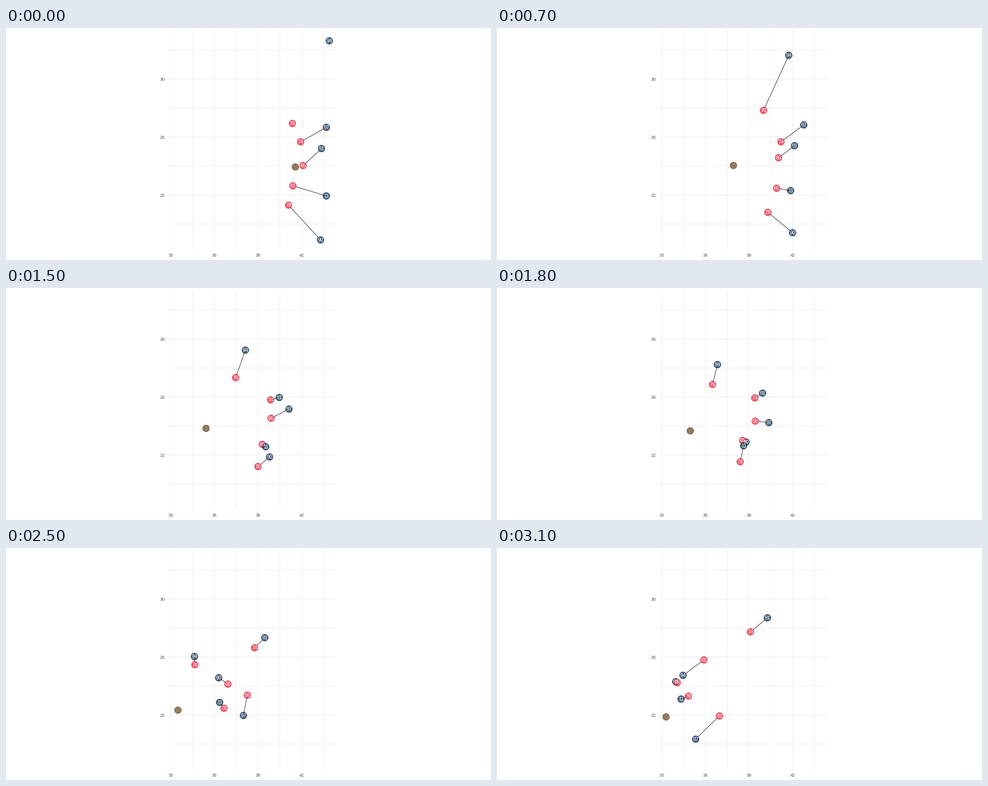
Write a matplotlib script that moves like this. It is 1000 px wide and 480 px high and loops after 3700 ms.

```python
from itertools import permutations

import matplotlib.pyplot as plt
import numpy as np
from matplotlib.animation import FuncAnimation
from matplotlib.collections import LineCollection

W, H, DPI = 1000, 480, 100
PX = 72 / DPI            # points per pixel
UNIT = 30                # pixels per yard
REACH = 5 * UNIT         # longest link between two players
LAST = 31                # motion stops here, then the pose is held
FRAMES = 37
ALPHA = 0.7
NAVY, RED, BROWN = "#002244", "#e31837", "#654321"

# Each player runs a cubic curve through four points at these times.
KEYS = [0, 11, 21, 31]
RUSHERS = {
    90: [(648, 438), (578, 390), (482, 291), (368, 276)],
    91: [(650, 249), (587, 236), (537, 205), (557, 144)],
    94: [(666, 26), (548, 89), (420, 188), (383, 263)],
    97: [(660, 205), (610, 220), (532, 307), (409, 395)],
    11: [(660, 347), (571, 332), (479, 323), (379, 312)],
}
BLOCKERS = {
    65: [(591, 326), (555, 329), (484, 303), (426, 231)],
    66: [(612, 284), (563, 266), (518, 285), (458, 347)],
    74: [(607, 235), (565, 234), (520, 220), (522, 173)],
    76: [(590, 197), (513, 173), (417, 216), (371, 278)],
    78: [(582, 366), (540, 378), (480, 348), (394, 306)],
}
DRAW_ORDER = [90, 91, 94, 97, 65, 66, 74, 78, 11, 76]

now = np.arange(LAST + 1)


def to_pixels(curve):
    """Centre positions on whole pixels."""
    return np.round(curve) + 0.5


def run(points):
    return to_pixels(np.vander(now, 4) @ np.polyfit(KEYS, points, 3))


def ball_run():
    """The ball moves in straight stretches at steady speed."""
    t = [0, 7, 12, 22, 25, 31]
    x = [596, 487, 426, 380, 354, 348]
    y = [287, 284, 286, 301, 335, 349]
    return to_pixels(np.column_stack([np.interp(now, t, x),
                                      np.interp(now, t, y)]))


paths = {n: run(p) for n, p in {**RUSHERS, **BLOCKERS}.items()}
ball = ball_run()


def links(f):
    """Pair blockers with rushers at the least total distance."""
    front = [paths[n][f] for n in BLOCKERS]
    rush = [paths[n][f] for n in RUSHERS]
    dist = [[np.hypot(*(a - b)) for b in rush] for a in front]
    best = min(permutations(range(len(rush))),
               key=lambda order: sum(row[j] for row, j in zip(dist, order)))
    return [(front[i], rush[j]) for i, j in enumerate(best)
            if dist[i][j] <= REACH]


fig = plt.figure(figsize=(W / DPI, H / DPI), dpi=DPI, facecolor="white")
ax = fig.add_axes([0, 0, 1, 1])
ax.set(xlim=(0, W), ylim=(H, 0))
ax.axis("off")


def add_lines(segments, color, width, zorder):
    lines = LineCollection(segments, colors=color, linewidths=width * PX,
                           capstyle="butt", snap=False, zorder=zorder)
    ax.add_collection(lines)
    return lines


def label(x, y, text, size, color, ha="center"):
    return ax.text(x, y, text, fontsize=size * PX, color=color, ha=ha,
                   va="baseline", family="Liberation Sans", zorder=4)


columns = [[(x + 0.5, 5), (x + 0.5, 459)] for x in range(339, 655, 45)]
rows = [[(332, y + 0.5), (682, y + 0.5)] for y in range(45, 406, 60)]
add_lines(columns + rows, "#ebebeb", 1, 1)

for k in range(4):
    label(339.5 + 90 * k, 473, str(33 + 3 * k), 9, "#4d4d4d")
for k in range(3):
    label(327.5, 109 + 120 * k, str(30 - 4 * k), 9, "#4d4d4d", "right")

lines = add_lines([], "black", 0.85, 2)
colors = [BROWN] + [NAVY if n in RUSHERS else RED for n in DRAW_ORDER]
dots = ax.scatter(np.zeros(len(colors)), np.zeros(len(colors)),
                  s=(14 * PX) ** 2, c=colors, edgecolors=colors,
                  linewidths=PX, alpha=ALPHA, snap=False, zorder=3)
numbers = {n: label(0, 0, str(n), 11, "white") for n in DRAW_ORDER}


def draw(frame):
    f = min(frame, LAST)
    lines.set_segments(links(f))
    dots.set_offsets([ball[f]] + [paths[n][f] for n in DRAW_ORDER])
    for n, text in numbers.items():
        x, y = paths[n][f]
        text.set_position((x, y + 3.5))
    return [lines, dots, *numbers.values()]


anim = FuncAnimation(fig, draw, frames=FRAMES, interval=100, repeat=True)
plt.show()
```
